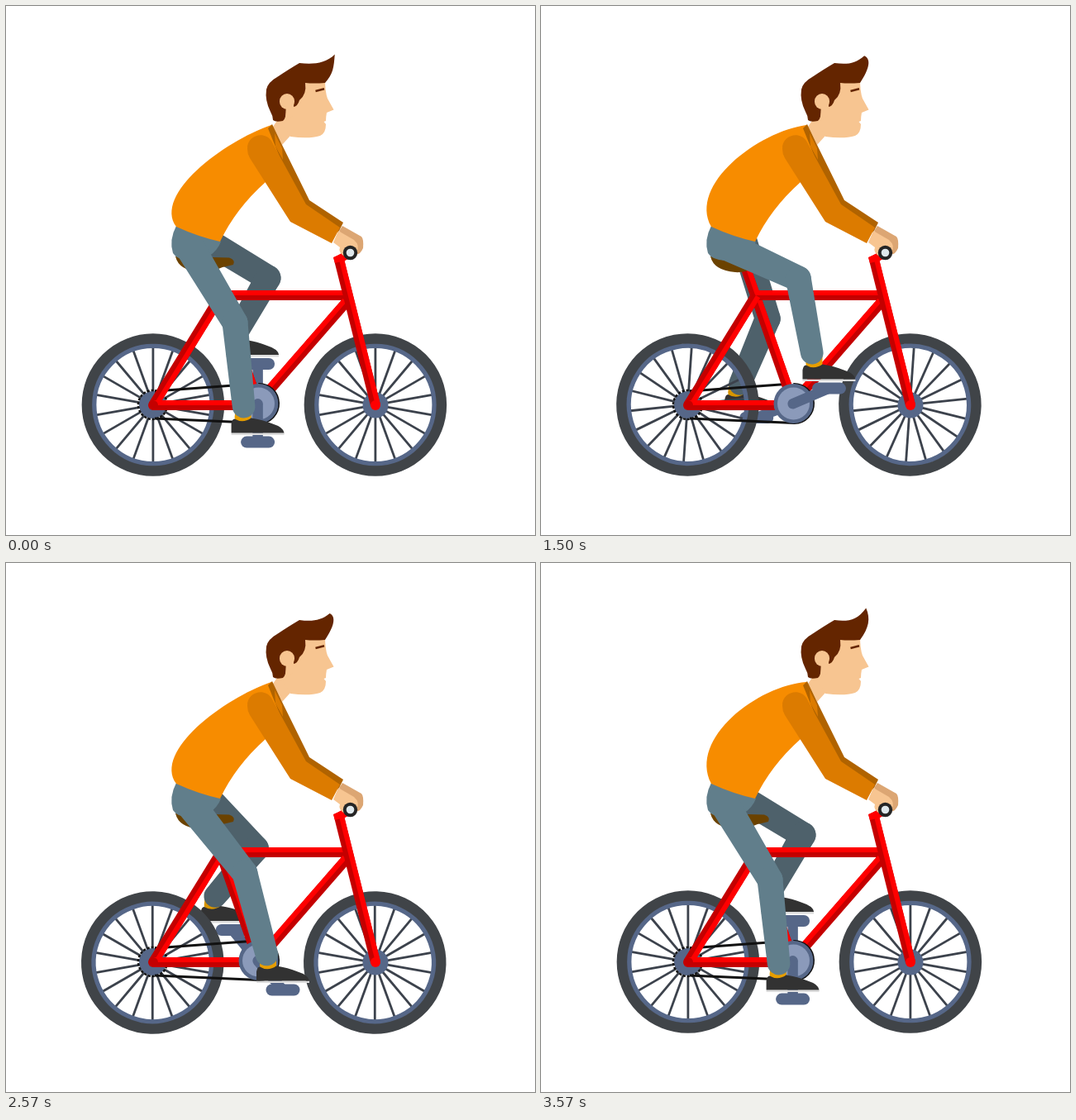
An HTML page with a canvas for the animation above (3.64 s loop, 640 px wide and 640 px high).

```html
<!DOCTYPE html>
<html>
<head>
<meta charset="utf-8">
<style>
  html, body { margin: 0; height: 100%; overflow: hidden; background: #fff; }
  canvas { display: block; }
</style>
</head>
<body>
<canvas id="stage" width="640" height="640"></canvas>
<script>
const ctx = document.getElementById('stage').getContext('2d');
const LOOP = 3640, SHOWN_FPS = 14, POSE_FPS = 25;
const TAU = Math.PI * 2, RAD = Math.PI / 180;
const { sin, cos } = Math;
const RED = '#ff0000', DARK_RED = '#c40000', STEEL = '#566788', SKIN = '#f7c591';
const HAIR = '#642500', SHIRT = '#f78c00', SLEEVE = '#dc7b00', BLACK = '#111';
const CRANK = { x: 304.6, y: 480.3, r: 47.3 };

const nearLeg = {
  pants: '#617e8b', sock: '#e69d00', hip: [220, 288, 18], foot: 0, ankle: 43,
  knee: { x: 293.5, y: 350, swing: 12.5, sway: 16.5, lift: 35.5 }
};
const farLeg = {
  pants: '#4e616b', sock: '#d79500', hip: [246, 286, 16], foot: -6.5, ankle: 41,
  knee: { x: 296, y: 361, swing: 15, sway: 21, lift: 29.5 }
};

function fill(path, color) {
  ctx.fillStyle = color;
  ctx.fill(new Path2D(path));
}

function disc(x, y, r, color) {
  ctx.fillStyle = color;
  ctx.beginPath();
  ctx.arc(x, y, r, 0, TAU);
  ctx.fill();
}

function ring(x, y, r, width, color, from = 0, to = TAU) {
  ctx.strokeStyle = color;
  ctx.lineWidth = width;
  ctx.lineCap = 'butt';
  ctx.beginPath();
  ctx.arc(x, y, r, from, to);
  ctx.stroke();
}

function line(x1, y1, x2, y2, width, color, cap = 'butt') {
  ctx.strokeStyle = color;
  ctx.lineWidth = width;
  ctx.lineCap = cap;
  ctx.beginPath();
  ctx.moveTo(x1, y1);
  ctx.lineTo(x2, y2);
  ctx.stroke();
}

// Dark bar with a bright half on the left of its direction.
function tube(x1, y1, x2, y2) {
  const len = Math.hypot(x2 - x1, y2 - y1);
  const nx = (y2 - y1) / len * 3, ny = (x1 - x2) / len * 3;
  line(x1, y1, x2, y2, 12, DARK_RED);
  line(x1 + nx, y1 + ny, x2 + nx, y2 + ny, 6, RED);
}

function limb(x1, y1, r1, x2, y2, r2, color) {
  const a = Math.atan2(y2 - y1, x2 - x1), h = Math.PI / 2;
  ctx.fillStyle = color;
  ctx.beginPath();
  ctx.arc(x1, y1, r1, a + h, a - h);
  ctx.arc(x2, y2, r2, a - h, a + h);
  ctx.fill();
}

function wheel(x, y, turn) {
  ctx.save();
  ctx.translate(x, y);
  ctx.rotate(turn);
  ctx.translate(0.4, -0.4);
  for (let i = 0; i < 18; i++) {
    line(0, 14, 0, 70, 2.8, '#3c424c');
    ctx.rotate(TAU / 18);
  }
  ring(0, 0, 71.5, 6, STEEL);
  ring(0, 0, 80, 12.5, '#404448');
  ctx.restore();
}

function pedalAt(a) {
  return [CRANK.x + CRANK.r * cos(a), CRANK.y + CRANK.r * sin(a)];
}

function crank(a) {
  const [x, y] = pedalAt(a);
  line(CRANK.x, CRANK.y + 1, x, y, 12.5, STEEL, 'round');
  line(x - 13.5, y, x + 13.5, y, 14, STEEL, 'round');
}

function leg(a, { pants, sock, hip, foot, ankle, knee }) {
  const [px, y] = pedalAt(a), x = px + foot;
  const kx = knee.x + knee.swing * cos(a) - knee.sway * sin(a);
  const ky = knee.y + knee.lift * sin(a) - 7 * cos(a) + 3 * sin(2 * a) + 2.5 * cos(2 * a);
  ctx.save();
  ctx.translate(x, y);
  fill('M-27-40H-8V-30Q-8-22-18-22Q-28-22-28-30Z', sock);
  ctx.restore();
  limb(...hip, kx, ky, 15.5, pants);
  limb(kx, ky, 15.5, x - 17 - 4 * cos(a), y - ankle, 13.8, pants);
  ctx.save();
  ctx.translate(x, y);
  fill('M-32-11H32V-8.5H-32Z', '#dcdcdc');
  fill('M-32-11V-22Q-31-28-28-28Q-18-22-8-29Q6-27 18-22Q31-18 32-11Z', '#323232');
  ctx.restore();
}

function frame() {
  tube(248, 318, 304, 478);
  tube(260, 350, 412, 350);
  tube(316, 468, 412, 358);
  tube(260, 350, 178, 483);
  tube(178, 483, 300, 483);
  disc(178, 483, 6, DARK_RED);
  line(404, 306, 416, 299, 10, RED);
  tube(402, 303, 447, 483);
  disc(447, 483, 6, RED);
  fill('M396 304L407 299L410 308L398 311Z', RED);
}

function chain() {
  ctx.setLineDash([3, 2]);
  ring(177.5, 482.5, 17.5, 2.5, BLACK);
  ctx.setLineDash([]);
  line(180, 466, 303, 457, 3, BLACK);
  line(180, 499, 306, 504.5, 3, BLACK);
}

function chainring() {
  ring(306, 481, 23.5, 3, BLACK, -1.6, 1.6);
  disc(305.5, 481, 24, STEEL);
  disc(305.5, 481, 19.5, '#8b9aba');
}

function torso(pose) {
  const bend = 8 * cos(pose / 16.3 * TAU);
  fill('M323 146L334 168L344 157L348 130L334 130Z', SKIN);
  fill(`M321 144C263 ${156 + bend} 178 ${220 + bend} 206 267Q232 279 259 285Q278 245 314 213L337 190L334 170Z`, SHIRT);
  fill('M317 148L322 143L333 166L367 235L408 262L402 274L362 243L334 190Z', '#b06300');
  fill('M325 154L334 172L335 186L326 170Z', SLEEVE);
  fill('M407 266L430 279Q433 282 432 293Q428 302 422 300L403 272Z', '#dca673');
  fill('M402 272L421 283Q429 290 424 298L411 304Q401 298 404 292L396 286Z', SKIN);
  fill('M292 173C291 157 312 150 321 163L363 240L404 268L394 287L344 261L295 184Q292 179 292 173Z', SLEEVE);
  disc(416.5, 298.5, 8.7, '#252525');
  disc(416.5, 298.5, 4.8, '#dfe8ec');
}

function head(pose) {
  // The quiff tip circles three times in 20 poses.
  const flap = pose * 3 / 20 * TAU;
  const x = 395.5 + 4.5 * cos(flap - 60 * RAD), y = 56.5 - 5 * cos(flap - 115 * RAD), lean = 397 - x;
  fill('M360 88H386Q386 104 389 112L396.5 125.5L388 129Q387 134 387 139L384.5 140L387 143Q387 154 380 157Q367 161 344 158L334 140L345 110Z', SKIN);
  fill(`M355 69C370 71 ${x - 11} 70 ${x} ${y}C${397 + lean * 0.5} ${73 - lean * 1.5} ${396 + lean * 0.2} ${82 - lean} 386 93Q372 94 362 93Q364 107 355 114Q353 121 348 122L339 124Q339 136 335 139Q326 141 323 138Q323 133 320 128Q313 114 315 101Q317 92 328 86Q343 76 355 69Z`, HAIR);
  limb(340, 115, 9, 340, 116, 9, SKIN);
  fill('M339 118L348 118L348 132L338 140Z', SKIN);
  line(374.5, 103, 385, 100.3, 2.6, HAIR);
}

function draw(pose) {
  const angle = (90 + 16 * pose) * RAD, turn = 8 * pose * RAD;
  ctx.fillStyle = '#fff';
  ctx.fillRect(0, 0, 640, 640);
  leg(angle + Math.PI, farLeg);
  crank(angle + Math.PI);
  wheel(177.5, 483, turn);
  wheel(446.5, 483, turn);
  disc(177.5, 482.5, 16.5, STEEL);
  disc(447, 483, 15.5, STEEL);
  chain();
  frame();
  chainring();
  crank(angle);
  fill('M205 303L270 304.5Q278 307 275 313L262 316Q246 323 235 322Q209 320 205 303Z', '#6b4200');
  fill('M206 266L260 285Q256 296 245 303L222 308Q207 307 202 299Q197 283 206 266Z', nearLeg.pants);
  leg(angle, nearLeg);
  torso(pose);
  head(pose);
}

// Poses run at 25 per second and are shown 14 times per second, on a 10 ms clock.
function tick() {
  const ticks = Math.floor(performance.now() % LOOP / 10);
  const shown = Math.floor((ticks + 0.5) * SHOWN_FPS / 100);
  draw(Math.floor((shown + 0.5) * POSE_FPS / SHOWN_FPS));
  requestAnimationFrame(tick);
}
tick();
</script>
</body>
</html>
```
